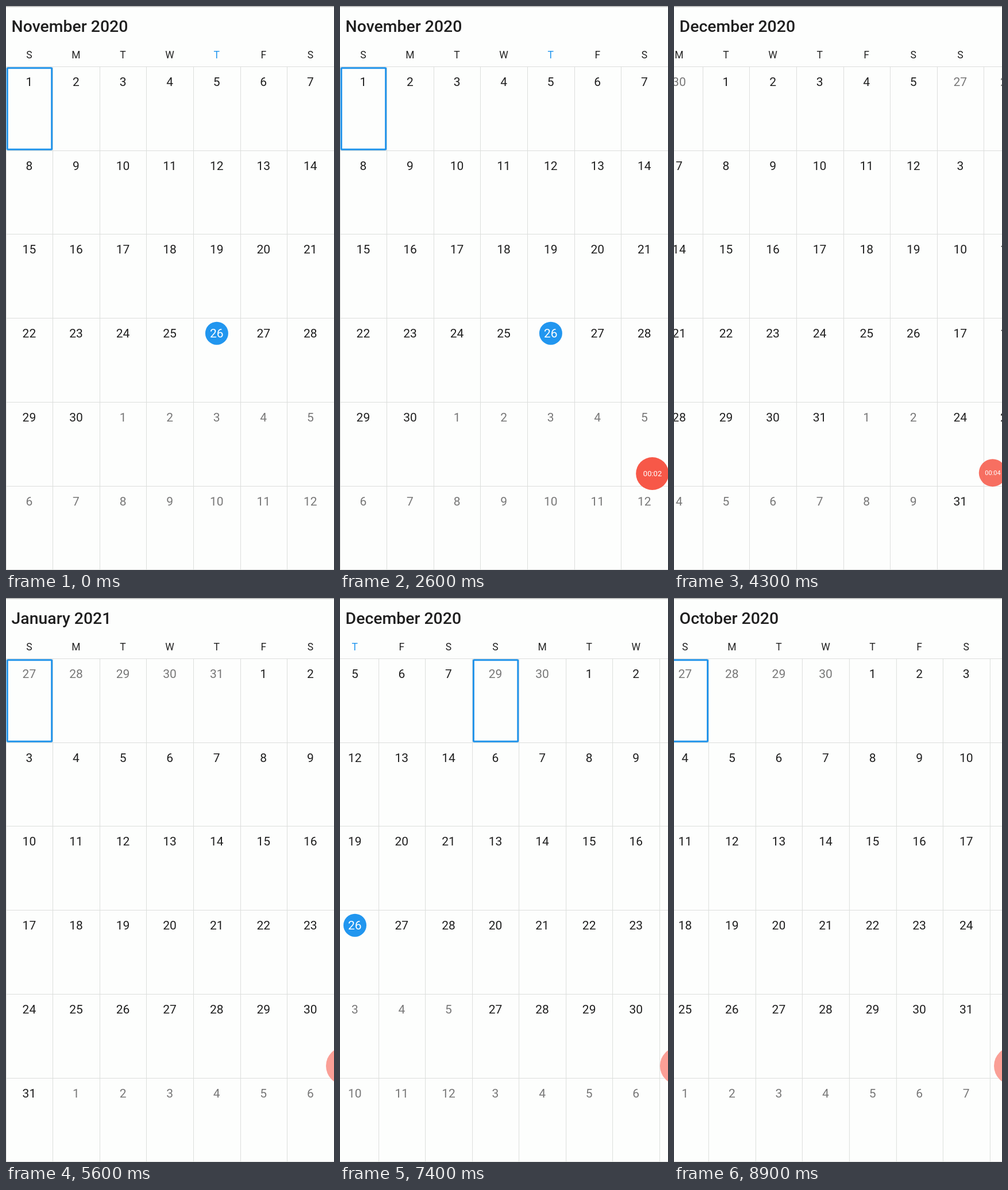
Animation of 571x980 px, one loop 9 s. Source, as an HTML page:

```html
<!DOCTYPE html>
<html lang="en">
<head>
<meta charset="utf-8">
<title>Month calendar</title>
<style>
  html, body { margin: 0; width: 100%; height: 100%; overflow: hidden; background: #fdfefd; }
  svg { display: block; font-family: Roboto, sans-serif; }
  .title { font-size: 28.4px; font-weight: 500; fill: #1f1f1f; }
  .week { font-size: 17.5px; fill: #222; text-anchor: middle; }
  .day { font-size: 21px; fill: #1f1f1f; text-anchor: middle; }
  .other { fill: #777; }
  .blue { fill: #2196ef; }
  .white { fill: #fff; }
  .grid { stroke: #dcdedc; fill: none; }
  .picked { stroke: #2093ea; stroke-width: 3; fill: none; }
  .time { font-size: 13px; fill: #fff; text-anchor: middle; }
</style>
</head>
<body>
<svg id="stage" width="571" height="980" viewBox="0 0 571 980"></svg>
<script>
const LOOP = 9000, STEP = 100;
const W = 571, COL = W / 7, TOP = 105.5, ROW = 145.75;
const stage = document.getElementById('stage');

function add(parent, tag, attrs, text) {
  const el = document.createElementNS('http://www.w3.org/2000/svg', tag);
  for (const key in attrs) el.setAttribute(key, attrs[key]);
  if (text !== undefined) el.textContent = text;
  parent.append(el);
  return el;
}

function makePage(month) {
  const g = add(stage, 'g', {});
  const first = new Date(2020, month, 1);
  const hasToday = month === 10;
  let lines = '';
  for (let c = 0; c < 7; c++) lines += `M${Math.round(c * COL - 0.3) + 0.5} ${TOP}V980`;
  for (let r = 0; r < 7; r++) lines += `M0 ${Math.floor(TOP + r * ROW - 0.2) + 0.5}H${W}`;
  add(g, 'path', { d: lines, class: 'grid' });

  [...'SMTWTFS'].forEach((name, c) => add(g, 'text', {
    x: 40.4 + c * COL, y: 91, class: hasToday && c === 4 ? 'week blue' : 'week'
  }, name));

  for (let i = 0; i < 42; i++) {
    const date = new Date(2020, month, 1 - first.getDay() + i);
    const same = date.getMonth() === first.getMonth();
    const today = hasToday && same && date.getDate() === 26;
    const x = 40.4 + (i % 7) * COL, y = 138.8 + Math.floor(i / 7) * ROW;
    if (today) add(g, 'circle', { cx: x + 0.2, cy: y - 7.4, r: 20, class: 'blue' });
    add(g, 'text', { x, y, class: 'day' + (today ? ' white' : same ? '' : ' other') }, date.getDate());
  }
  const picked = add(g, 'rect', { x: 2.3, y: 107.8, width: 77.4, height: 141.4, rx: 1, class: 'picked' });
  const name = first.toLocaleString('en-US', { month: 'long' });
  return { g, picked, title: name + ' ' + first.getFullYear() };
}

const pages = [9, 10, 11, 12].map(makePage);
add(stage, 'rect', { width: W, height: 1.6, fill: '#b4b5b4' });
const title = add(stage, 'text', { x: 9.6, y: 44.5, class: 'title' });

// Recorder bubble, and the pale form it takes at the edge
const bubble = add(stage, 'g', {});
add(bubble, 'circle', { r: 28.5, fill: '#f75848' });
const time = add(bubble, 'text', { x: 0.3, y: 4.7, class: 'time' });
const docked = add(stage, 'circle', { cx: 590, cy: 813, r: 33, fill: '#fa9f96' });

// Swipe progress at each step, from finger drag to settling
const slow = [0, 0.07, 0.198, 0.55, 0.86, 0.97, 1];
const quick = [0, 0.1, 0.403, 0.8, 0.963, 1];
const flick = [0, 0.15, 0.65, 0.946, 0.99, 1];
const swipes = [
  [2600, 1, slow], [4100, 1, slow],
  [6000, -1, flick], [7200, -1, quick], [8500, -1, quick]
];

function position(t) {
  let pos = 1;
  for (const [start, dir, curve] of swipes) {
    const step = Math.floor((t - start) / STEP);
    if (step > 0) pos += dir * curve[Math.min(step, curve.length - 1)];
  }
  return pos;
}

function draw(now) {
  const t = Math.floor((now % LOOP) / STEP) * STEP;
  const pos = position(t), current = Math.round(pos);
  pages.forEach(({ g, picked }, i) => {
    g.setAttribute('transform', `translate(${(i - pos) * W})`);
    g.style.display = Math.abs(i - pos) < 1 ? '' : 'none';
    picked.style.display = i === current ? '' : 'none';
  });
  title.textContent = pages[current].title;

  const away = Math.max(0, (t - 4100) / 200);
  const shown = Math.min(1, Math.max(0, (t - 2300) / 250));
  bubble.style.display = shown && t < 4500 ? '' : 'none';
  bubble.setAttribute('opacity', shown * (1 - 0.14 * away));
  bubble.setAttribute('transform',
    `translate(${543.7 + 11 * away} ${812.5 - 1.3 * away}) scale(${1 - 0.16 * away})`);
  time.textContent = '00:0' + (t < 3100 ? 2 : t < 4100 ? 3 : 4);
  docked.style.display = t >= 4500 ? '' : 'none';
}

const began = performance.now();
function tick() {
  draw(performance.now() - began);
  requestAnimationFrame(tick);
}
tick();
</script>
</body>
</html>
```
